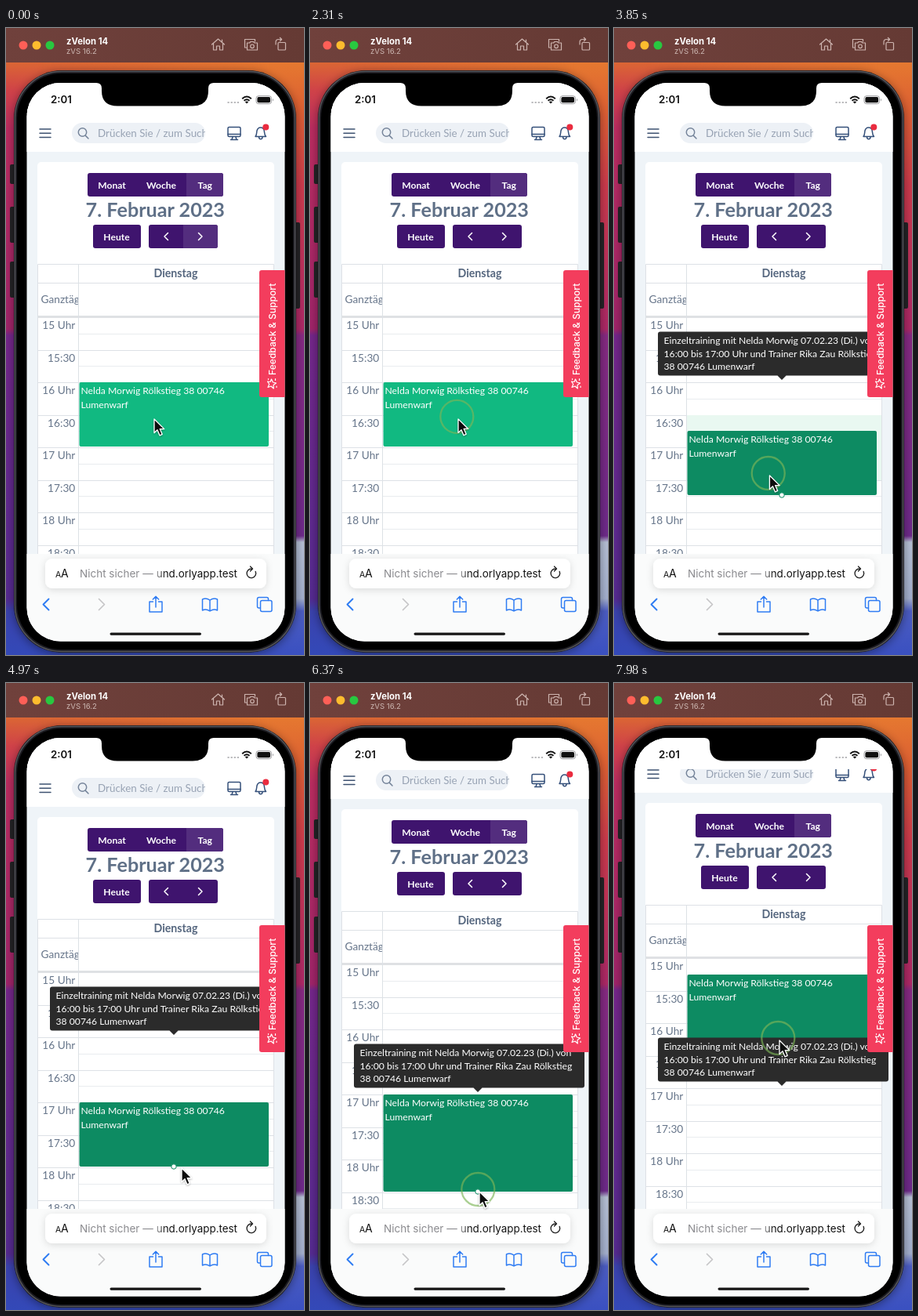
Animation of 380 by 800 pixels, one loop 8 s. Source, as an HTML page:

```html
<!DOCTYPE html>
<html lang="de">
<head>
<meta charset="utf-8">
<title>Kalender</title>
<style>
html, body { margin: 0; width: 100%; height: 100%; overflow: hidden; background: #222; }
svg { display: block; width: 380px; height: 800px; }
text { font-family: Lato, "Open Sans", sans-serif; white-space: pre; }
.ui { font-family: Inter, Roboto, sans-serif; }
.b { font-weight: 700; }
.mid { text-anchor: middle; }
.btn { font-size: 12.1px; font-weight: 700; fill: #fff; text-anchor: middle; }
.time { font-size: 13.7px; fill: #66758a; text-anchor: end; }
.small { font-size: 12.2px; fill: #fff; }
.line { fill: none; stroke-linecap: round; stroke-linejoin: round; }
</style>
</head>
<body>
<svg viewBox="0 0 380 800">
  <defs>
    <linearGradient id="left" x2="0" y2="1">
      <stop offset=".05" stop-color="#dc6a32"/><stop offset=".1" stop-color="#cf4248"/>
      <stop offset=".16" stop-color="#bb2c60"/><stop offset=".48" stop-color="#a02469"/>
      <stop offset=".49" stop-color="#74268a"/><stop offset=".91" stop-color="#552a90"/>
      <stop offset=".93" stop-color="#3a42ac"/><stop offset="1" stop-color="#3349b8"/>
    </linearGradient>
    <linearGradient id="right" x2="0" y2="1">
      <stop offset=".05" stop-color="#e67a30"/><stop offset=".13" stop-color="#dc5f32"/>
      <stop offset=".25" stop-color="#cc3a4c"/><stop offset=".48" stop-color="#ad2866"/>
      <stop offset=".49" stop-color="#862a82"/><stop offset=".81" stop-color="#6e2a8a"/>
      <stop offset=".82" stop-color="#b5bfd4"/><stop offset=".91" stop-color="#a3afcd"/>
      <stop offset=".93" stop-color="#4b5cc2"/><stop offset="1" stop-color="#3a50c0"/>
    </linearGradient>
    <linearGradient id="across" gradientUnits="userSpaceOnUse" x1="40" x2="340">
      <stop offset="0" stop-color="#000"/><stop offset="1" stop-color="#fff"/>
    </linearGradient>
    <mask id="blend"><rect width="380" height="800" fill="url(#across)"/></mask>
    <linearGradient id="bar"><stop offset="0" stop-color="#70413c"/><stop offset="1" stop-color="#653a34"/></linearGradient>
    <linearGradient id="urlFade" gradientUnits="userSpaceOnUse" x1="189" x2="203">
      <stop offset="0" stop-color="#c4c4c6"/><stop offset="1" stop-color="#111"/>
    </linearGradient>
    <clipPath id="screen"><rect x="26.5" y="70" width="329" height="712.5" rx="43"/></clipPath>
    <clipPath id="searchBox"><rect x="84" y="121" width="170" height="26" rx="13"/></clipPath>
    <clipPath id="axis"><rect x="40" y="326" width="52" height="40"/></clipPath>
    <filter id="soft" x="-10%" y="-40%" width="120%" height="180%"><feDropShadow dx="0" dy="2" stdDeviation="5" flood-opacity=".13"/></filter>
    <filter id="drop" x="-50%" y="-50%" width="200%" height="200%"><feDropShadow dx="0" dy="1" stdDeviation="1" flood-opacity=".35"/></filter>
    <filter id="shade" x="-10%" y="-10%" width="120%" height="120%"><feDropShadow dx="0" dy="2" stdDeviation="6" flood-opacity=".4"/></filter>
  </defs>

  <!-- desktop -->
  <rect width="380" height="800" fill="url(#left)"/>
  <rect width="380" height="800" fill="url(#right)" mask="url(#blend)"/>

  <!-- phone body -->
  <g fill="#242326">
    <rect x="5" y="174" width="8" height="25" rx="2"/>
    <rect x="5" y="228" width="8" height="46" rx="2"/>
    <rect x="5" y="298" width="8" height="46" rx="2"/>
    <rect x="366" y="248" width="9" height="110" rx="2"/>
  </g>
  <rect x="10" y="54" width="360" height="743" rx="61" fill="#1d1d20" filter="url(#shade)"/>
  <rect x="11.5" y="55.5" width="357" height="740" rx="59.5" fill="none" stroke="#55555a" stroke-width="1.4"/>
  <rect x="14" y="58" width="352" height="735" rx="57" fill="#000"/>

  <g clip-path="url(#screen)">
    <rect x="26" y="70" width="330" height="713" fill="#eff4f8"/>
    <g id="page">
      <rect x="26" y="70" width="330" height="88" fill="#fff"/>
      <path class="line" d="M43 129H57M43 134.3H57M43 139.6H57" stroke="#3d5170" stroke-width="1.5"/>
      <rect x="84" y="121" width="170" height="26" rx="13" fill="#edf1f6"/>
      <path class="line" d="M101.4 137.4L105 141" stroke="#75849a" stroke-width="1.5"/>
      <circle cx="97.5" cy="133" r="5.2" fill="none" stroke="#75849a" stroke-width="1.5"/>
      <g clip-path="url(#searchBox)"><text x="117" y="139" font-size="13.4" fill="#98a3b4">Drücken Sie / zum Suchen</text></g>
      <g class="line" stroke="#35507a" stroke-width="1.5">
        <rect x="283" y="126.5" width="16" height="12" rx="1.5"/>
        <path d="M283 135.5H299M289 139L288 142.5H294L293 139M286.5 142.5H295.5"/>
        <path d="M318 138.5C320 136.5 319.5 133 320 131C321 127.5 323 127 324.5 127C327 127 329 128.5 329.3 131.5C329.6 134 329.5 136.5 331.5 138.5ZM322.5 139C322.5 142.5 327 142.5 327 139"/>
      </g>
      <circle cx="331.3" cy="126.5" r="4" fill="#ea2c3f"/>

      <rect x="40" y="171" width="302" height="560" rx="5" fill="#fff"/>
      <rect x="104" y="185" width="173" height="30" rx="3" fill="#3f146e"/>
      <path d="M230 185H274a3 3 0 0 1 3 3V212a3 3 0 0 1-3 3H230Z" fill="#532d7e"/>
      <text class="btn" x="135" y="204.5">Monat</text>
      <text class="btn" x="198" y="204.5">Woche</text>
      <text class="btn" x="253.8" y="204.5">Tag</text>
      <text class="b mid" x="190.3" y="241" font-size="25.2" fill="#5f7087">7. Februar 2023</text>
      <rect x="111" y="251" width="61" height="30" rx="3" fill="#3f146e"/>
      <text class="btn" x="141" y="270.5">Heute</text>
      <rect x="182" y="251" width="88" height="30" rx="3" fill="#3f146e"/>
      <path id="next" d="M226 251H267a3 3 0 0 1 3 3V278a3 3 0 0 1-3 3H226Z" fill="#532d7e"/>
      <path class="line" d="M206.5 261.5L202 266L206.5 270.5M245.5 261.5L250 266L245.5 270.5" stroke="#fff" stroke-width="1.5"/>

      <g id="grid"></g>
      <rect x="40" y="367" width="302" height="3" fill="#dfe1e4"/>
      <path d="M40.5 700V301.5H341.5V700M92.5 301.5V700M40.5 325.5H341.5" fill="none" stroke="#dde1e6"/>
      <text class="b mid" x="216.5" y="318.3" font-size="14.2" fill="#56677f">Dienstag</text>
      <g clip-path="url(#axis)"><text x="44.5" y="351" font-size="13.7" fill="#66758a">Ganztägig</text></g>

      <rect id="trace" x="93" width="248" fill="#e9f8f1"/>
      <g id="event">
        <rect id="box" x="93.5" width="241.5" rx="2"/>
        <text class="small" x="95.5" y="14.8">Nelda Morwig Rölkstieg 38 00746</text>
        <text class="small" x="95.5" y="32.8">Lumenwarf</text>
        <circle id="grip" cx="214" r="3.2" fill="#fff" stroke="#0d8b62" stroke-width="1"/>
      </g>
      <g id="tip">
        <path d="M59 0H347a3 3 0 0 1 3 3V53a3 3 0 0 1-3 3H219.5L214 61.5L208.5 56H59a3 3 0 0 1-3-3V3a3 3 0 0 1 3-3Z" fill="#2b2b2b"/>
        <text class="small" x="63.5" y="15.5">Einzeltraining mit Nelda Morwig 07.02.23 (Di.) von</text>
        <text class="small" x="63.5" y="32">16:00 bis 17:00 Uhr und Trainer Rika Zau Rölkstieg</text>
        <text class="small" x="63.5" y="48.5">38 00746 Lumenwarf</text>
      </g>
    </g>

    <!-- feedback tab -->
    <path d="M356 309H326a3 3 0 0 0-3 3V468a3 3 0 0 0 3 3H356Z" fill="#f33d5d"/>
    <text class="ui" transform="translate(344.3 443) rotate(-90)" font-size="12.1" font-weight="500" fill="#fff">Feedback &amp; Support</text>
    <path class="line" d="M338.5 448L340.3 452L344.5 453L341 455.5L341.3 460L338 457L334 458.5L335.7 454.5L333.5 451L337 451.5ZM343.5 447.5V449.5M334.5 447.5V448.5M345 457V458.5" stroke="#fff" stroke-width="1.2"/>

    <!-- status bar -->
    <rect x="26" y="70" width="330" height="40" fill="#fff"/>
    <text class="ui" x="57" y="96.3" font-size="13.3" font-weight="600" fill="#111">2:01</text>
    <path d="M282.5 95H297" stroke="#b9b9bc" stroke-width="2" stroke-dasharray="2.2 1.9"/>
    <path d="M301.2 90.2Q307 85 312.8 90.2M303.5 92.7Q307 89.8 310.5 92.7" fill="none" stroke="#111" stroke-width="1.9"/>
    <path d="M304.8 94.3Q307 92.8 309.2 94.3L307 96.6Z" fill="#111"/>
    <rect x="319" y="86.7" width="19.5" height="10" rx="3" fill="none" stroke="#9b9b9e"/>
    <rect x="320.4" y="88.1" width="16.7" height="7.2" rx="1.8" fill="#111"/>
    <path d="M340 90Q342 91.7 340 93.4Z" fill="#9b9b9e"/>
    <path d="M115 69V70Q122 70 122 77V80Q122 99.5 142 99.5H238Q258 99.5 258 80V77Q258 70 265 70V69Z" fill="#000"/>

    <!-- browser bar -->
    <rect x="26" y="671" width="330" height="112" fill="#fafbfb"/>
    <rect x="50" y="677" width="282" height="38" rx="9" fill="#fff" filter="url(#soft)"/>
    <g fill="#111">
      <text class="ui" x="63" y="700.5" font-size="10.5">A</text>
      <text class="ui" x="70" y="700.5" font-size="14">A</text>
      <text class="ui" x="94" y="700.5" font-size="13.5" fill="#8a8a8e">Nicht sicher —</text>
      <text class="ui" x="295" y="700.5" font-size="13.4" text-anchor="end" fill="url(#urlFade)">und.orlyapp.test</text>
    </g>
    <path class="line" d="M318.2 693.5A5.8 5.8 0 1 1 313 690M311.5 687L314.5 690L311.5 693" stroke="#222" stroke-width="1.4"/>
    <g class="line" stroke="#2f7cf3" stroke-width="1.5">
      <path d="M54.5 728.5L47.5 735.5L54.5 742.5" stroke-width="1.9"/>
      <path d="M118.5 728.5L125.5 735.5L118.5 742.5" stroke="#c6c6c8" stroke-width="1.7"/>
      <path d="M187.5 732H183V745H199V732H194.5M191 739V725.5M187.3 729L191 725.3L194.7 729"/>
      <path d="M260 730Q255 726.5 250.5 729V743Q255 740.5 260 744Q265 740.5 269.5 743V729Q265 726.5 260 730V744"/>
      <path d="M324 740H322.5Q320.5 740 320.5 738V728.5Q320.5 726.5 322.5 726.5H332.5Q334.5 726.5 334.5 728.5V730.5"/>
      <rect x="324.5" y="730.5" width="14.5" height="14" rx="2"/>
    </g>
    <rect x="132.5" y="771.5" width="116.5" height="3.2" rx="1.6" fill="#151515"/>
  </g>

  <!-- window bar -->
  <rect width="380" height="44" fill="url(#bar)"/>
  <circle cx="22" cy="22" r="5.5" fill="#fe5f57"/>
  <circle cx="39" cy="22" r="5.5" fill="#febc2e"/>
  <circle cx="56" cy="22" r="5.5" fill="#28c840"/>
  <text class="ui b" x="77" y="20.5" font-size="11.3" fill="#fff">zVelon 14</text>
  <text class="ui" x="77" y="32.5" font-size="9.6" fill="#ccb6b1">zVS 16.2</text>
  <g class="line" stroke="#cdb4af" stroke-width="1.2">
    <path d="M262.5 21L270.5 14L278.5 21M264.5 20V28H268.5V23H272.5V28H276.5V20M275.5 15V18"/>
    <path d="M307 25H304.5V14.5H317.5V17"/>
    <path d="M307.5 19H310.5L312 17.5H315.5L317 19H320.5V28H307.5Z"/>
    <circle cx="314" cy="23.3" r="2.3"/>
    <rect x="347" y="18.5" width="9.5" height="9.5" rx="1"/>
    <path d="M344 21V18Q344 14.5 347.5 14.5H351.5M349.3 12.3L351.6 14.5L349.3 16.7"/>
  </g>

  <circle id="ring" fill="none" stroke="#7db558" stroke-width="2.3"/>
  <path id="cursor" d="M0 0V17.5L4 13.8L7 20.8L10.2 19.4L7.2 12.6H12.7Z" fill="#0b0b0b" stroke="#fff" stroke-width="1.3" stroke-linejoin="round" filter="url(#drop)"/>
</svg>
<script>
const LOOP = 8000, TICK = 70, SLOT = 20.75, TOP = 369;
const $ = id => document.getElementById(id);
const set = (id, attrs) => { for (const k in attrs) $(id).setAttribute(k, attrs[k]); };
const move = (id, x, y) => set(id, { transform: `translate(${x} ${y})` });
const clamp = v => Math.min(1, Math.max(0, v));
const snap = d => Math.round(d / SLOT) * SLOT;

// time, x, y of the pointer
const path = [
  [0, 189, 499], [1400, 189, 498], [2600, 189, 499], [4240, 200, 583], [4400, 200, 583],
  [4900, 224, 619], [5040, 224, 619], [5300, 215, 620], [5600, 215, 620], [6200, 216, 649],
  [6650, 216, 649], [7130, 223, 599], [7260, 223, 599], [7900, 211, 456], [8000, 211, 456]
];
const presses = [[1400, 4350], [5350, 6650], [7260, 8200]];

function pointer(t) {
  const i = Math.max(1, path.findIndex(p => p[0] > t));
  const [t0, x0, y0] = path[i - 1], [t1, x1, y1] = path[i];
  const u = clamp((t - t0) / (t1 - t0)), e = u * u * (3 - 2 * u);
  return [x0 + (x1 - x0) * e, y0 + (y1 - y0) * e];
}

const scrollAt = t => Math.round(18 * clamp((t - 5950) / 750));

function eventTop(t) {
  const y = pointer(t)[1];
  let d = 4 * SLOT;
  if (t < 2600) d = 0;
  else if (t < 4350) d = snap(y - 499);
  else if (t > 7260) d += snap(y - 599);
  return Math.round(TOP + 4 * SLOT + d);
}

function eventHeight(t) {
  const grow = t < 5600 ? 0 : t < 6650 ? snap(pointer(t)[1] + scrollAt(t) - 620) : 2 * SLOT;
  return Math.round(4 * SLOT + grow);
}

function buildGrid() {
  let out = '';
  for (let i = 0; i < 16; i++) {
    const y = Math.round(TOP + i * SLOT) + .5, half = i % 2 === 0;
    out += `<path d="M${half ? 40 : 92} ${y}H341" stroke="${half ? '#dde1e6' : '#e9ecef'}"/>`;
    if (!half) continue;
    const hour = 15 + Math.floor(i / 4);
    out += `<text class="time" x="88.3" y="${y + 14.5}">${hour}${i % 4 ? ':30' : ' Uhr'}</text>`;
  }
  $('grid').innerHTML = out;
}

function draw(t) {
  const [x, y] = pointer(t), chosen = t >= 2450;
  const height = eventHeight(t);

  move('page', 0, -scrollAt(t));
  move('event', 0, eventTop(t));
  set('box', { height: height - 1, fill: chosen ? '#0d8b62' : '#11b981' });
  set('grip', { cy: height - 1, opacity: +chosen });
  set('trace', { y: eventTop(t - 350), height: 4 * SLOT, opacity: +(chosen && t < 4350) });
  set('next', { opacity: 1 - clamp((t - 1750) / 140) });

  const again = t >= 5350;
  move('tip', 0, again ? 470.5 : 387.5);
  set('tip', { opacity: clamp((t - (again ? 5280 : 2380)) / 140) });

  let on = 0;
  for (const [a, b] of presses) on = Math.max(on, Math.min(clamp((t - a) / 250), clamp((b + 150 - t) / 150)));
  set('ring', { cx: x - 1.7, cy: y - 3, r: 17 + 4 * on, opacity: on * .65 });
  move('cursor', x, y);
}

buildGrid();
const start = performance.now();
function frame() {
  const t = (performance.now() - start) % LOOP;
  draw(Math.floor(t / TICK) * TICK);
  requestAnimationFrame(frame);
}
draw(0);
requestAnimationFrame(frame);
</script>
</body>
</html>
```
